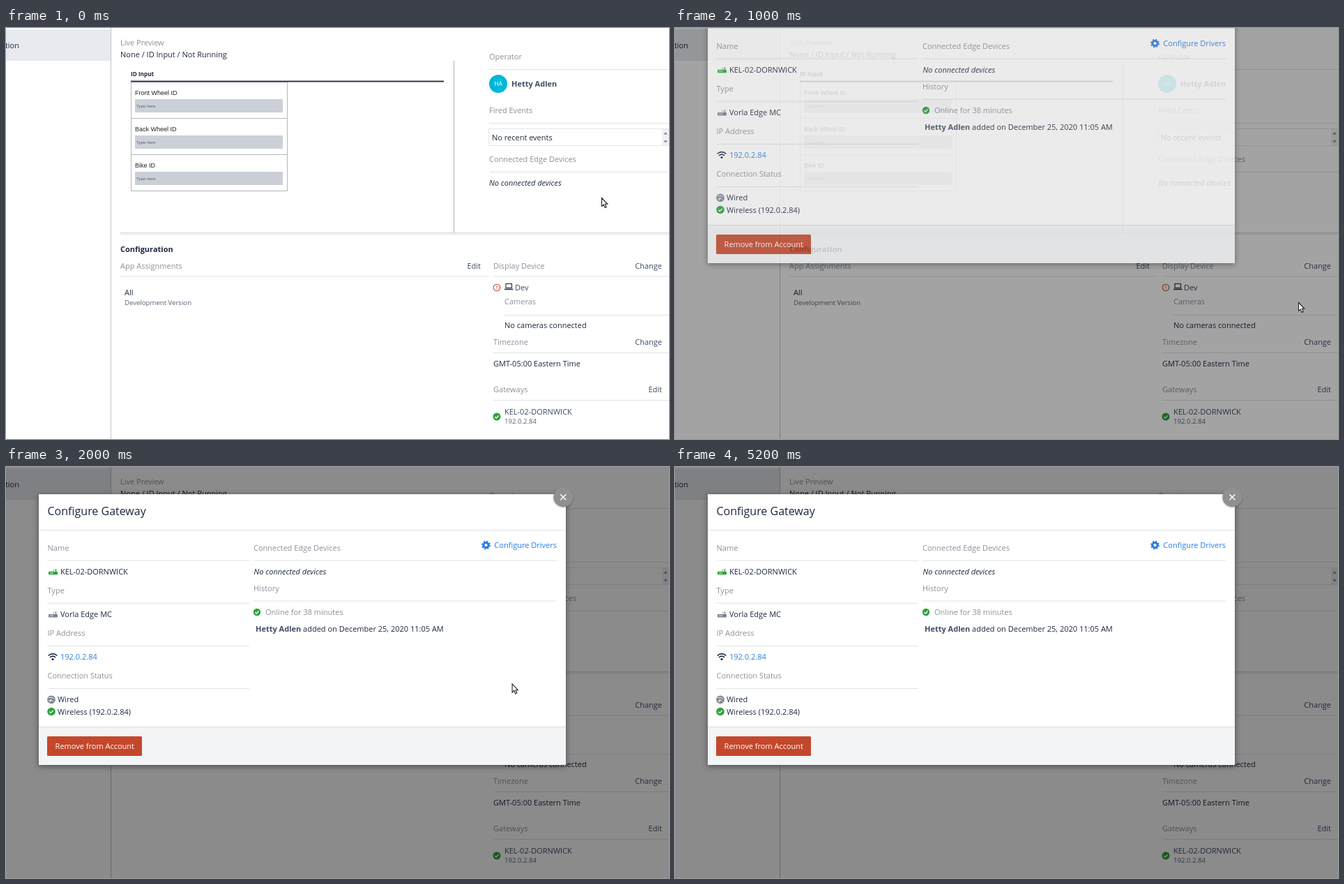
These frames come from a looping animation (951 px wide and 589 px high, 5.5 s). An HTML page:

```html
<!DOCTYPE html>
<html lang="en">
<head>
<meta charset="utf-8">
<title>Configure gateway</title>
<style>
  html, body { margin: 0; width: 100%; height: 100%; overflow: hidden; background: #fff; }
  svg { display: block; width: 951px; height: 589px; }
  text { font: 11px "Open Sans", "Noto Sans", sans-serif; fill: #1d2840; white-space: pre; }
  .label { fill: #8c919b; }
  .action { fill: #3d4a66; }
  .link { fill: #2b7de1; }
  .bold { font-weight: 700; }
  .name { font-weight: 700; fill: #3f4c63; }
  .italic { font-style: italic; }
  .small { font-size: 9.6px; fill: #566175; }
  .title { font-size: 16px; }
  .white { fill: #fff; }
  .initials { font-size: 8.5px; fill: #fff; }
  .heading { font-size: 8.2px; font-weight: 700; }
  .field { font: 9px "Liberation Sans", Arial, sans-serif; fill: #222; }
  .hint { font: 6.2px "Liberation Sans", Arial, sans-serif; fill: #5b6069; }
  .end { text-anchor: end; }
  .mid { text-anchor: middle; }
  .shadow { filter: drop-shadow(0 2px 4px rgba(0, 0, 0, .45)); }
  .soft { filter: drop-shadow(0 1px 1px rgba(0, 0, 0, .25)); }
</style>
</head>
<body>
<svg id="stage" viewBox="0 0 951 589"></svg>
<script>
const LOOP = 5500, STEP = 100;
const USER = "Hetty Adlen", GATEWAY = "KEL-02-DORNWICK", ADDRESS = "192.0.2.84";
const INK = "#1d2840", GREY = "#7b828f", GREEN = "#2fa33c", RED = "#c4472b", BLUE = "#2b7de1";

// Markup helpers; text is placed by the middle of its capitals.
const text = (x, middle, content, style = "", drop = 4) =>
  `<text x="${x}" y="${middle + drop}" class="${style}">${content}</text>`;
const rect = (x, y, w, h, fill, extra = "") =>
  `<rect x="${x}" y="${y}" width="${w}" height="${h}" fill="${fill}" ${extra}/>`;
const circle = (x, y, r, fill, extra = "") =>
  `<circle cx="${x}" cy="${y}" r="${r}" fill="${fill}" ${extra}/>`;
const stroke = (d, color, width = 1) =>
  `<path d="${d}" fill="none" stroke="${color}" stroke-width="${width}"/>`;
const rule = (left, right, y, color = "#e0e2e5") => stroke(`M${left} ${y}H${right}`, color);
const section = (left, right, y, label, gap = 18.5) =>
  text(left, y, label, "label") + rule(left, right, y + gap);
const action = (right, y, label) => text(right, y, label, "action end");

// Icons, placed by their centre.
const check = (x, y, r = 5.5) => circle(x, y, r, GREEN) +
  stroke(`M${x - 2.6} ${y + .2}l1.9 1.9l3.3 -3.6`, "#fff", 1.4);
const router = color => (x, y) =>
  rect(x - 6, y, 13, 4.4, color, 'rx="1"') +
  stroke(`M${x + 4.5} ${y - 4}v4`, color, 1.3) + stroke(`M${x} ${y - 1.8}h3`, color, .8) +
  stroke(`M${x - 4} ${y + 2.2}h5`, "#fff", .9);
const wifi = (x, y) =>
  stroke(`M${x - 6.3} ${y - 1.8}q6.3 -5.4 12.6 0M${x - 4} ${y + .7}q4 -3.4 8 0`, INK, 1.6) +
  circle(x, y + 3.3, 1.6, INK);
const globe = (x, y) => circle(x - 2, y, 5.8, GREY) +
  stroke(`M${x - 6} ${y - 2}q4 -3 8 1M${x - 6} ${y + 2}l4 -2l3 3M${x - 4} ${y + 4}l2 -4`, "#fff");
const gear = (x, y) =>
  circle(x, y, 3.6, "none", `stroke="${BLUE}" stroke-width="3"`) +
  circle(x, y, 5.4, "none", `stroke="${BLUE}" stroke-width="2" stroke-dasharray="2.2 2.04"`);
const warning = (x, y) => circle(x, y, 4.8, "none", `stroke="${RED}" stroke-width="1.1"`) +
  stroke(`M${x} ${y - 2.5}v3m0 1v1`, RED);
const laptop = (x, y) => rect(x - 4, y - 4, 8.5, 6, "none", `stroke="${INK}" stroke-width="1.1"`) +
  stroke(`M${x - 6} ${y + 4}h12.5`, INK, 1.5);

const previewRow = (name, i) => {
  const y = 77.5 + 52 * i;
  return rect(179.5, y, 224, 52, "none", 'stroke="#b4b6ba"') +
    text(185, y + 15, name, "field", 3.3) +
    rect(185, y + 24.5, 212, 19, "#cbcfd8") +
    text(187, y + 34, "Type here", "hint", 2.2);
};

const page =
  rect(0, 0, 951, 589, "#fff") +
  rect(0, 2, 150, 45, "#e9eaef") + text(19, 25, "tion", "end") +
  stroke("M150.5 0V589", "#bfc2ca") +

  text(164, 21, "Live Preview", "label") +
  text(164, 38, "None / ID Input / Not Running") +
  text(179, 66, "ID Input", "heading", 3) +
  ["Front Wheel ID", "Back Wheel ID", "Bike ID"].map(previewRow).join("") +
  rect(179, 75.5, 449, 2, "#2e394d") +
  stroke("M642.5 47V293", "#a9adb5") +
  rule(164, 951, 293.5, "#d3d5da") + rule(164, 951, 295.5, "#dcdee2") +

  section(693, 951, 41, "Operator") +
  circle(706, 80, 13, "#00b6d9") + text(706, 79.5, "HA", "initials mid", 3) +
  text(725, 80, USER, "name") +
  section(693, 951, 118, "Fired Events") +
  rect(692.5, 144.5, 260, 24, "#fff", 'stroke="#e6e7ea"') +
  rect(941, 145, 10, 23, "#f0f0f0") +
  '<path d="M943.3 152.5h5.6l-2.8 -3.2zM943.3 161.3h5.6l-2.8 3.2z" fill="#858585"/>' +
  text(697, 156.5, "No recent events") +
  section(693, 951, 188, "Connected Edge Devices") +
  text(693, 222, "No connected devices", "italic") +

  text(164, 317, "Configuration", "bold") +
  section(164, 693, 341, "App Assignments", 15) + action(681, 341, "Edit") +
  text(170, 378.5, "All") + text(170, 393.5, "Development Version", "small", 3.4) +

  section(699, 951, 341, "Display Device", 15) + action(941, 341, "Change") +
  warning(704, 372) + laptop(721, 370.5) + text(730, 372, "Dev", "action") +
  section(715, 951, 392, "Cameras", 19.5) +
  text(715, 426, "No cameras connected") +
  section(699, 951, 450, "Timezone", 15.5) + action(941, 450, "Change") +
  text(699, 481, "GMT-05:00 Eastern Time") +
  section(699, 951, 518, "Gateways", 15.5) + action(941, 518, "Edit") +
  check(704, 557) +
  text(715, 549.5, GATEWAY, "action") + text(715, 564, ADDRESS, "small", 3.4);

const details = [
  ["Name", router(GREEN), GATEWAY],
  ["Type", router(GREY), "Vorla Edge MC"],
  ["IP Address", wifi, ADDRESS, "link"],
  ["Connection Status", globe, "Wired"]
].map(([label, icon, value, style], i) => {
  const y = 115.5 + 61.2 * i;
  return section(59.5, 349, y, label) + icon(67, y + 34.3) +
    text(icon === globe ? 74 : 78, y + 34.3, value, style);
}).join("");

const dialog =
  rect(47, 39, 756, 388, "#fff", 'class="shadow"') +
  text(59.5, 63, "Configure Gateway", "title", 5.8) + rule(47, 803, 90.5) +
  details +
  check(65, 350.5, 5.8) + text(74, 350.5, `Wireless (${ADDRESS})`) +

  section(355, 790, 115.5, "Connected Edge Devices") +
  gear(688.5, 112) + text(790, 112, "Configure Drivers", "link end") +
  text(355.5, 150, "No connected devices", "italic") +
  section(355, 790, 173.5, "History") +
  check(360, 208, 5.2) + text(372, 208, "Online for 38 minutes", "label") +
  text(358, 231.5, `<tspan class="name">${USER}</tspan> added on December 25, 2020 11:05 AM`) +

  rect(47, 372, 756, 55, "#f2f4f6") + rule(47, 803, 372.5, "#dcdfe3") +
  rect(59, 386, 136, 28, RED, 'rx="1.5"') +
  text(127.3, 400, "Remove from Account", "white mid") +
  circle(799.3, 43.2, 14, "#909090", 'class="soft"') +
  stroke("M795.3 39.2l8 8m0 -8l-8 8", "#fff", 1.5);

document.getElementById("stage").innerHTML = page +
  rect(0, 0, 951, 589, "#000", 'id="dim"') +
  `<g id="dialog">${dialog}</g>` +
  `<path id="cursor" d="M.5 .5V12.6L3.2 10.1L5.2 14.5L7.2 13.6L5.3 9.3H8.8Z"
    fill="#fff" stroke="#222" stroke-width="1.1"/>`;

const progress = (time, start, end) => Math.min(1, Math.max(0, (time - start) / (end - start)));

// Pointer moves: it rests between them.
const moves = [
  { start: 0, end: 300, x: 897, y: 440 },
  { start: 300, end: 600, x: 796, y: 554 },
  { start: 600, end: 800, x: 836, y: 505 },
  { start: 800, end: 900, x: 894, y: 393 },
  { start: 1900, end: 2400, x: 52, y: -20 },
  { start: 2800, end: 2900, x: 26, y: -9 },
  { start: 2900, end: 3200, x: 94, y: 388 },
  { start: 3200, end: 3600, x: 64, y: 358 },
  { start: 4100, end: 4200, x: 107, y: 358 },
  { start: 4900, end: 5200, x: 30, y: -20 }
];
const pointerAt = time => moves.reduce(([x, y], move) => {
  const part = progress(time, move.start, move.end);
  return [x + (move.x - x) * part, y + (move.y - y) * part];
}, [854, 243]);

const [dimNode, dialogNode, cursorNode] =
  ["dim", "dialog", "cursor"].map(id => document.getElementById(id));

function draw() {
  const time = Math.floor(performance.now() % LOOP / STEP) * STEP;
  const hidden = (1 - progress(time, 793, 1299)) ** 3;
  dimNode.setAttribute("opacity", .455 * (1 - hidden));
  dialogNode.setAttribute("opacity", 1 - hidden);
  dialogNode.setAttribute("transform", `translate(0 ${Math.round(-438.5 * hidden)})`);
  cursorNode.setAttribute("transform", `translate(${pointerAt(time)})`);
  requestAnimationFrame(draw);
}
draw();
</script>
</body>
</html>
```
